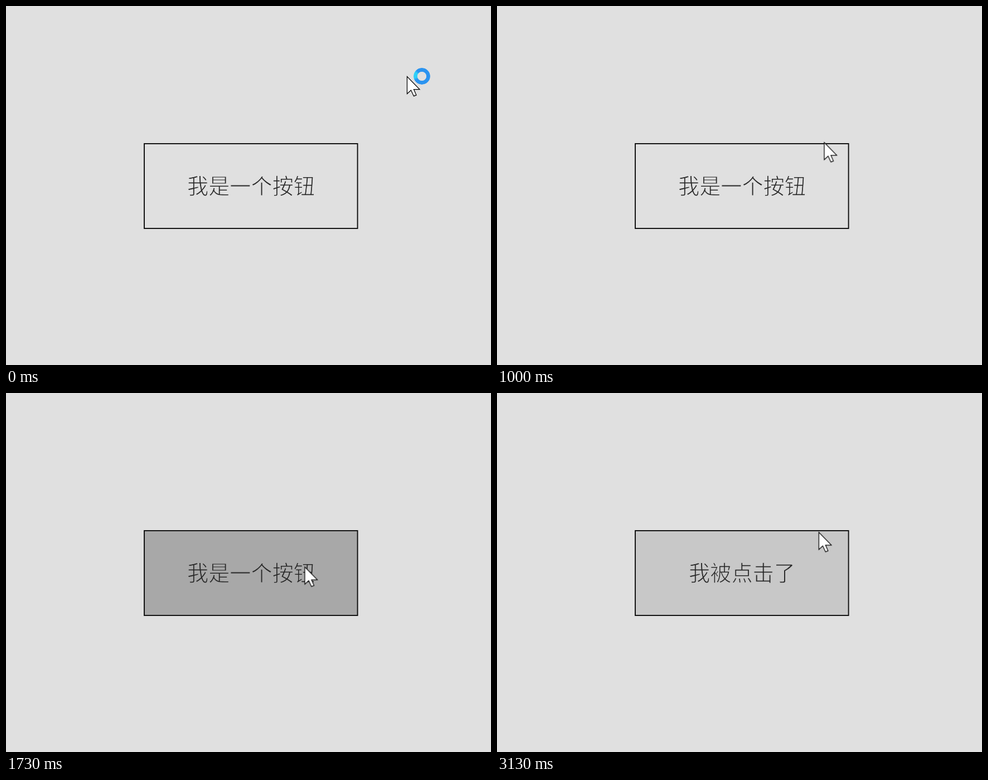
An HTML page that plays this animation: 870 px wide and 644 px high, repeating every 3190 ms.

```html
<!DOCTYPE html>
<html lang="zh-CN">
<head>
<meta charset="utf-8">
<title>按钮</title>
<style>
  html, body { margin: 0; width: 100%; height: 100%; overflow: hidden; background: #e0e0e0; }
  .stage { position: relative; width: 870px; height: 644px; overflow: hidden; }
  svg { position: absolute; left: 0; top: 0; display: block; overflow: visible; }

  .button, .label, .pointer, .busy, .arc { animation: 3190ms step-end infinite; }

  .button { color: #e0e0e0; animation-name: face; }
  .face { fill: currentColor; stroke: #0c0c0c; stroke-width: 1.9; }
  /* the face-coloured outline thins the letters to a light weight */
  .label {
    font: 300 38.2px "Noto Sans CJK SC", "Noto Sans CJK", sans-serif;
    fill: #262626;
    stroke: currentColor;
    stroke-width: 1.1;
    text-anchor: middle;
  }
  .idle { animation-name: idle; }
  .done { animation-name: done; }

  .pointer { position: absolute; left: 0; top: 0; width: 24px; height: 36px; animation-name: move; }
  .arrow { fill: #fff; stroke: #000; stroke-width: 1.25; }

  .busy {
    position: absolute; left: 12px; top: -15px; width: 30px; height: 30px;
    border-radius: 50%;
    -webkit-mask: radial-gradient(circle, transparent 7.7px, #000 8.5px);
    mask: radial-gradient(circle, transparent 7.7px, #000 8.5px);
    animation-name: busy;
  }
  .arc {
    width: 100%; height: 100%; border-radius: 50%;
    background: conic-gradient(#2b94f0 0 238deg, #2fd0f8 258deg 300deg, #2b94f0 320deg);
    animation-name: spin;
  }

  @keyframes face {
    0% { color: #e0e0e0; }
    33.54% { color: #c8c8c8; }
    54.23% { color: #a8a8a8; }
    58.62%, 100% { color: #c8c8c8; }
  }
  @keyframes idle {
    0% { opacity: 1; }
    58.62%, 100% { opacity: 0; }
  }
  @keyframes done {
    0% { opacity: 0; }
    58.62%, 100% { opacity: 1; }
  }
  @keyframes busy {
    0% { opacity: 1; }
    27.27%, 100% { opacity: 0; }
  }
  @keyframes spin {
    0% { transform: rotate(0deg); }
    21%, 100% { transform: rotate(-10deg); }
  }
  @keyframes move {
    0% { transform: translate(719px, 126px); }
    21% { transform: translate(707.6px, 134.7px); }
    22.88% { transform: translate(690px, 151px); }
    25.07% { transform: translate(665px, 174px); }
    27.27% { transform: translate(638px, 199px); }
    29.15% { transform: translate(612px, 222px); }
    31.34% { transform: translate(586.5px, 244.2px); }
    33.54% { transform: translate(564px, 271px); }
    35.42% { transform: translate(547px, 295px); }
    37.61% { transform: translate(539px, 307px); }
    39.81% { transform: translate(535.5px, 311.5px); }
    96.23% { transform: translate(549px, 294px); }
    98.11%, 100% { transform: translate(576.8px, 249.3px); }
  }
</style>
</head>
<body>
<div class="stage">
  <svg width="870" height="644">
    <g class="button">
      <rect class="face" x="248" y="247" width="382.6" height="152"/>
      <text class="label idle" x="439.5" y="336.5">我是一个按钮</text>
      <text class="label done" x="439.5" y="336.5">我被点击了</text>
    </g>
  </svg>
  <div class="pointer">
    <div class="busy"><div class="arc"></div></div>
    <svg width="24" height="36">
      <path class="arrow" d="M.5 .5V31.5L7.5 25L12.5 35.7L17 33.8L12.5 23.5H23Z"/>
    </svg>
  </div>
</div>
</body>
</html>
```
